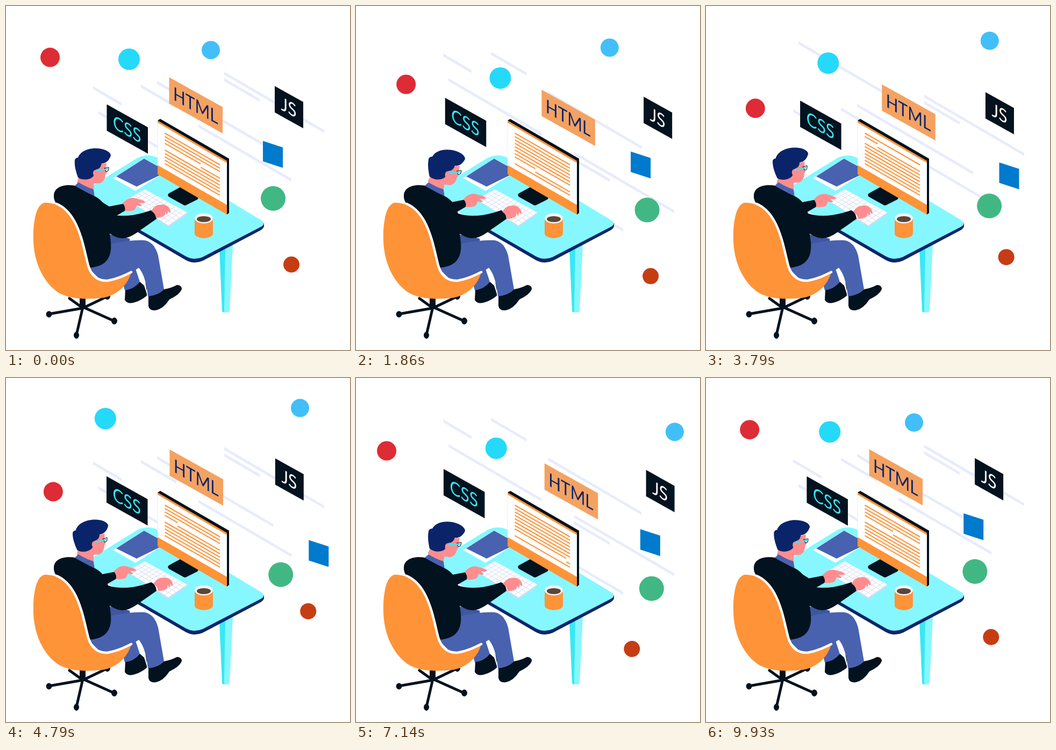
These frames come from a looping animation (640x640 px, 10000 ms). An HTML page:

```html
<!DOCTYPE html>
<html lang="en">
<head>
<meta charset="utf-8">
<title>Developer at a desk</title>
<style>
html,body{margin:0;width:100%;height:100%;overflow:hidden;background:#fff}
svg{display:block;width:100%;height:100%}
text{font-family:Lato,"Open Sans",sans-serif;font-size:34.5px;text-anchor:middle}
</style>
</head>
<body>
<svg viewBox="0 0 640 640">
  <g id="streaks" fill="#e7ebfd"></g>
  <g id="dots"></g>
  <path id="tile" fill="#007acc" d="M0 0L37 12V50L0 38Z"/>
  <g id="plates"></g>

  <!-- desk -->
  <path fill="#38e8f5" d="M397 452L411 446L406 570Q402 570 402 567Z"/>
  <path fill="#86f7ff" d="M408 448L422 444L416 567Q415 571 406 570Z"/>
  <path fill="#0a246a" d="M235 410L480 404V409Q480 413 474 417L366 474Q350 481 335 473L225 409Z"/>
  <path fill="#86f7ff" d="M163 333L244 283Q264 273 283 283L474 398Q485 405 474 411L366 467Q350 474 335 466L165 368Z"/>
  <path fill="#fff" d="M199 320L258 284L299 307L241 344Z"/>
  <path fill="#4862b0" d="M205 317L257 284L300 308L243 336Z"/>

  <!-- monitor -->
  <path fill="#02121e" d="M304 348L326 336L357 354Q359 357 356 360L336 370Q333 372 330 370L303 355Q299 351 304 348Z"/>
  <path fill="#02121e" d="M282 213L287 210L415 284V385L411 388Z"/>
  <path fill="#ff9338" d="M282 213L411 288V388L282 313Z"/>
  <path fill="#fff" d="M282 217L411 292V370L282 296Z"/>
  <path fill="none" stroke="#e3e8f5" stroke-width=".8" d="M282 217V296"/>
  <g id="code" stroke="#ff9338" stroke-width="2.1"></g>

  <!-- keyboard and mug -->
  <path fill="#d3dcf0" d="M225 360L302 411L337 387V384L225 357Z"/>
  <path fill="#fff" d="M225 360L258 341L337 384L302 408Z"/>
  <g id="keys" stroke="#dbe3f5" stroke-width="1.2"></g>
  <path fill="#ff9338" d="M351 394H385V423A17 9 0 0 1 351 423Z"/>
  <ellipse cx="368" cy="395" rx="17" ry="9.5" fill="#f4f4f8"/>
  <ellipse cx="368" cy="396.5" rx="13" ry="5.5" fill="#5b4637"/>

  <!-- chair base -->
  <g stroke="#02121e" fill="#02121e" stroke-linecap="round">
    <path fill="none" stroke-width="5" d="M118 544L143 562L189 540M143 562L80 573M143 560L131 612M143 560L201 586"/>
    <path fill="none" stroke-width="11" stroke-linecap="butt" d="M142.5 538V562"/>
    <ellipse cx="188.5" cy="540" rx="5" ry="6"/><ellipse cx="80" cy="573.5" rx="5" ry="5.5"/>
    <ellipse cx="131" cy="612.5" rx="4.5" ry="6"/><ellipse cx="201.5" cy="586" rx="5" ry="6"/>
  </g>

  <!-- legs -->
  <path fill="#02121e" d="M222 527Q236 528 249 513Q258 512 262 517V539Q250 549 237 552Q226 555 221 547Z"/>
  <path fill="#4862b0" d="M212 495L243 487L249 513Q238 527 221 529Z"/>
  <path fill="#3f56a0" d="M185 424Q215 428 230 433L232 448L190 452Z"/>
  <path fill="#02121e" d="M265 538Q280 540 294 527Q307 525 318 519Q327 519 327 527Q323 537 304 546Q293 563 279 566Q267 568 265 558Z"/>
  <path fill="#fff" d="M240 486L247 484Q258 494 263 539L257 520L249 513Z"/>
  <path fill="#4862b0" d="M153 487L192 458L193 443Q233 434 258 436Q276 439 283 464L294 527Q282 539 264 540Q260 502 247 487L232 497Q204 513 177 511Z"/>

  <g id="farArm">
    <path fill="#02121e" d="M158 352L192 373L218 368Q225 374 223 380L197 395L160 400Z"/>
    <path fill="#ff8d8f" d="M217 367Q228 355 239 357L249 360Q256 361 259 365Q256 368 247 366Q252 370 253 372Q249 373 243 371Q242 377 238 380Q229 383 221 381Q223 374 217 367Z"/>
  </g>

  <g id="head">
    <path fill="#ff8d8f" d="M136 316L165 306L163 342Q148 338 132 329Z"/>
    <path fill="#ff8d8f" d="M160 298L187 292L186 306L188 309L185 314Q184 327 174 330H160Z"/>
    <path fill="#0a246a" d="M134 282C139 268 160 262 178 266C189 268 195 274 195 278C192 288 185 293 178 293Q176 303 168 304Q162 307 163 316C157 324 142 325 134 319C129 305 127 295 128 286Q130 282 134 282Z"/>
    <ellipse cx="166" cy="311" rx="4" ry="6" fill="#ff8d8f"/>
    <path fill="none" stroke="#02121e" d="M183 302L191 300Q192 308 186 308Z"/>
    <path fill="none" stroke="#38e8f5" stroke-width="2.5" d="M168 307L190 303"/>
  </g>
  <path fill="#4862b0" d="M126 336L135 328Q149 337 163 341L165 357L140 350Z"/>

  <!-- torso and near arm -->
  <path fill="#02121e" d="M89 352C90 337 107 331 127 334Q150 347 165 354Q185 364 189 386L193 425C197 448 197 466 183 478Q172 486 155 487C148 460 140 420 115 385C100 372 88 368 89 352Z"/>
  <path fill="#02121e" d="M165 354Q180 361 190 386Q222 397 270 380Q279 384 280 396L243 422Q220 438 203 429L180 417Z"/>
  <path id="nearHand" fill="#ff8d8f" d="M270 381Q278 369 286 370Q292 368 298 371Q306 376 306 383Q304 387 301 380Q302 386 299 388Q297 384 296 383Q297 389 293 391Q286 395 279 394Q278 386 270 381Z"/>

  <!-- chair shell -->
  <path fill="#ff9338" d="M72 366C94 366 111 375 123 394C139 420 146 455 152 483C158 505 174 512 190 511C208 508 222 502 233 495C227 520 204 540 179 543C150 546 121 546 99 534C67 514 52 473 51 437C50 409 54 369 72 366Z"/>
  <path fill="none" stroke="#fff" stroke-width="4.5" stroke-linecap="round" d="M94 368C109 374 119 386 127 400C141 425 147 460 153 483C159 503 172 512 189 511C207 508 221 501 233 495"/>
</svg>
<script>
const $ = id => document.getElementById(id);
const LOOP = 10000, HALF = LOOP / 2;

function add(parent, tag, attrs, text) {
  const el = document.createElementNS("http://www.w3.org/2000/svg", tag);
  for (const k in attrs) el.setAttribute(k, attrs[k]);
  if (text) el.textContent = text;
  parent.appendChild(el);
  return el;
}
const move = (el, x, y) => el.setAttribute("transform", `translate(${x} ${y})`);
const mix = (a, b, u) => a + (b - a) * u;
const clamp = (v, lo, hi) => Math.min(hi, Math.max(lo, v));
const smooth = u => u * u * (3 - 2 * u);
const wave = turns => Math.sin(turns * 2 * Math.PI);

// dots travel a closed polygon, each side taking the same time
const dots = [
  { fill: "#dd2c35", r: 18, path: [[82, 95.5], [97, 163], [87, 216], [52, 122]] },
  { fill: "#25d9fb", r: 20, path: [[229, 99], [282, 146], [176, 69], [275, 141]] },
  { fill: "#42bff8", r: 17, path: [[381, 82], [503, 76], [551, 54], [600, 108]] },
  { fill: "#41b883", r: 23, path: [[497, 358], [545, 381], [525, 371], [490, 358], [595, 417]] },
  { fill: "#c63d14", r: 15, path: [[531, 481], [554, 510], [563, 427], [505, 517]] }
];
for (const d of dots) d.el = add($("dots"), "circle", { fill: d.fill, r: d.r });

function along(path, t) {
  const s = t / LOOP * path.length, i = Math.floor(s);
  const a = path[i], b = path[(i + 1) % path.length];
  return [mix(a[0], b[0], s - i), mix(a[1], b[1], s - i)];
}

// lettered plates slide to and fro along the slanted axis
const SLANT = 0.558;
const plates = [
  { text: "CSS", w: 76.5, x: 187.5, y: 183, shift: -26, fill: "#02121e", ink: "#38e8f5" },
  { text: "HTML", w: 99.5, x: 303.5, y: 132.5, shift: 50, fill: "#f4a261", ink: "#0a246a" },
  { text: "JS", w: 53, x: 500, y: 149, shift: 42, fill: "#02121e", ink: "#fff" }
];
for (const p of plates) {
  const drop = p.w * SLANT;
  p.el = add($("plates"), "g", {});
  add(p.el, "path", { fill: p.fill, d: `M0 0L${p.w} ${drop}v49L0 49Z` });
  add(p.el, "text", { fill: p.ink,
    transform: `matrix(.866 .483 0 1 ${p.w / 2 - 0.5} ${drop / 2 + 37})` }, p.text);
}

// background streaks: left, right, rest height, moment of restart
const streaks = [
  [162, 215, 152, 3150], [251, 317, 149, 3150], [172, 345, 198, 4200],
  [281, 497, 142, 1300], [406, 592, 125, 400], [406, 472, 137, 400],
  [358, 531, 223, 3150]
].map(([x1, x2, y, restart]) => {
  const d = `M${x1} -2.7L${x2} ${(x2 - x1) * 0.584 - 2.7}v5.4L${x1} 2.7Z`;
  return { y, restart, el: add($("streaks"), "path", { d }) };
});
// height above rest over a run of two half loops, slowing as it climbs
function rise(age) {
  const left = HALF - age;
  return 0.0395 * left + 1.95e-6 * left * left + 8 * wave(age / HALF);
}

// lines of code and keyboard grid
const ROWS = 10;
const rows = Array.from({ length: ROWS }, () => add($("code"), "path", {}));
function strip(a, b, y) {
  const at = u => `${295.5 + u * 102.5} ${y + u * 59}`;
  return `M${at(a)}L${at(b)}`;
}
const keyLine = (x1, y1, x2, y2) => add($("keys"), "line", { x1, y1, x2, y2 });
for (let u = 0.2; u < 0.9; u += 0.2)
  keyLine(225 + 33 * u, 360 - 19 * u, 302 + 35 * u, 408 - 24 * u);
for (let i = 1; i < 11; i++) {
  const u = i / 11;
  keyLine(225 + 77 * u, 360 + 48 * u, 258 + 79 * u, 341 + 43 * u);
}

function draw(t) {
  const p = t % HALF, toEnd = Math.min(t, LOOP - t);
  for (const d of dots) move(d.el, ...along(d.path, t));

  const swing = smooth(Math.min(p, HALF - p) / (HALF / 2));
  for (const q of plates) {
    const dx = q.shift * swing;
    move(q.el, q.x + dx, q.y + dx * SLANT);
  }
  const slide = 0.0178 * toEnd;
  move($("tile"), 478 + slide, 251 + slide * 0.593);

  for (const s of streaks) move(s.el, 0, s.y + rise(p < s.restart ? p + HALF : p));

  // text is typed on one row while the next row is wiped
  const pen = (3.65 + 2 * ROWS * t / LOOP) % ROWS;
  const now = Math.floor(pen), u = pen - now;
  rows.forEach((el, i) => {
    const from = i === (now + 1) % ROWS ? u : 0;
    const to = i === now ? u : 1;
    el.setAttribute("d", strip(from, to, 236.5 + 6.3 * i));
  });

  const turn = clamp(20 * wave(p / HALF), -4.5, 8);
  $("head").setAttribute("transform", `rotate(${turn} 150 338)`);
  const back = smooth(clamp(toEnd / 700, 0, 1));
  const tap = wave(t / LOOP * 20);
  move($("farArm"), back * (tap - 16), back * (tap * 0.6 - 7));
  const reach = 4 * wave(t / LOOP / 2) ** 2;
  move($("nearHand"), reach + Math.abs(tap) * 0.8, reach * 0.3 + Math.abs(tap) * 1.5);
}

function tick() {
  draw(performance.now() % LOOP);
  requestAnimationFrame(tick);
}
draw(0);
requestAnimationFrame(tick);
</script>
</body>
</html>
```
